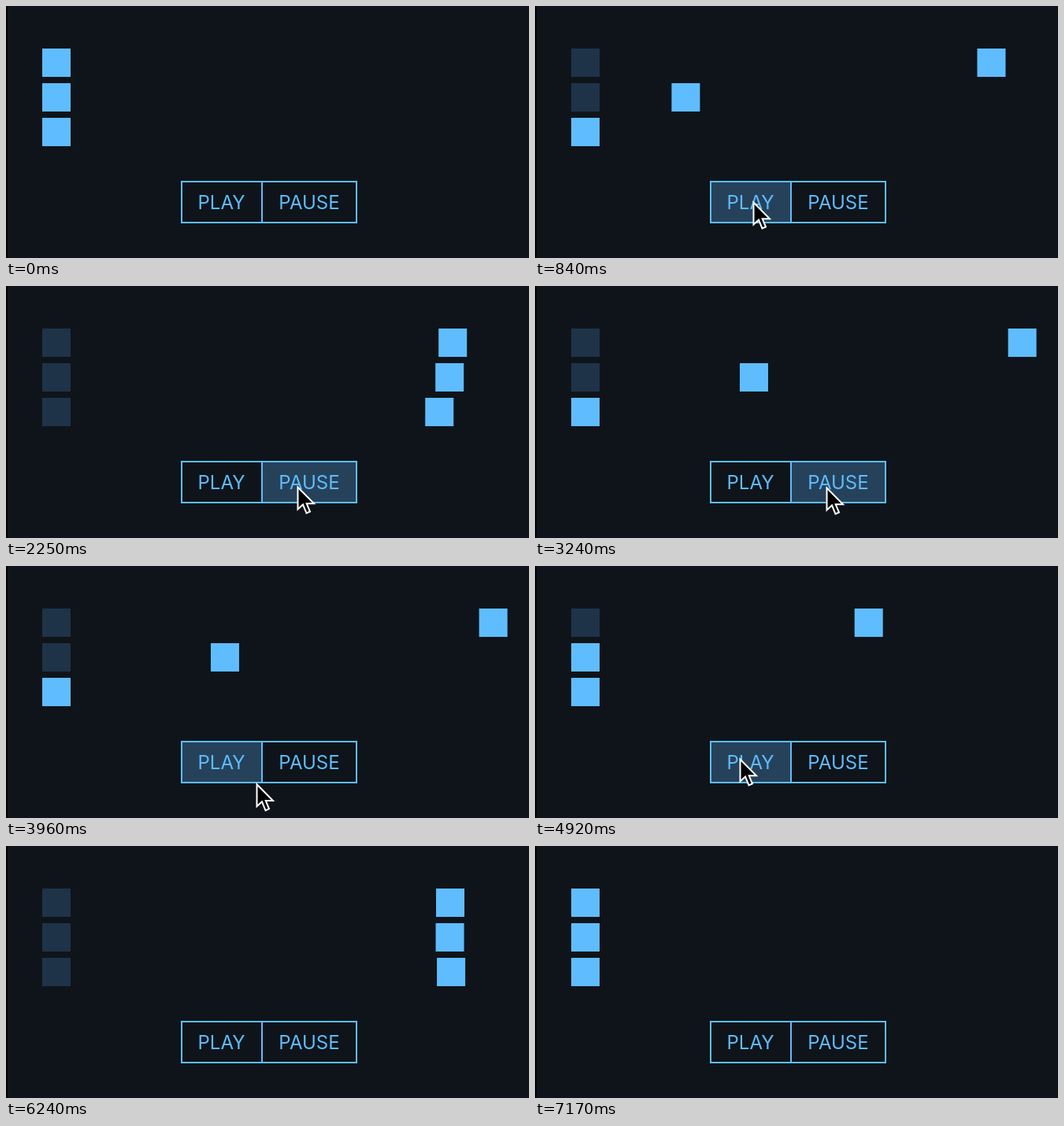
Write an HTML page that moves like this. It is 664 by 320 pixels and loops after 7.2 s.

```html
<!DOCTYPE html>
<html lang="en">
<head>
<meta charset="utf-8">
<title>Play and pause</title>
<style>
  html, body { margin: 0; width: 100%; height: 100%; overflow: hidden; background: #0f141a; }
  svg { display: block; width: 664px; height: 320px; }
  .shadow { fill: #1e3348; }
  .box { fill: #5fbdff; }
  .button { fill: transparent; }
  .button.hover { fill: #26425b; }
  .border { fill: none; stroke: #5fbdff; stroke-width: 2; }
  text { font: 400 24px Inter, Roboto, sans-serif; fill: #5fbdff; text-anchor: middle; }
  #cursor { fill: #000; stroke: #fff; stroke-width: 2; }
</style>
</head>
<body>
<svg viewBox="0 0 664 320">
  <rect width="2" height="320" fill="#000"/>
  <g id="boxes"></g>
  <rect class="button" x="223" y="223" width="102" height="52"/>
  <rect class="button" x="325" y="223" width="120" height="52"/>
  <path class="border" d="M223 223H445V275H223ZM325 223V275"/>
  <text x="273.5" y="258">PLAY</text>
  <text x="385" y="258">PAUSE</text>
  <path id="cursor" d="M1.5 2.5V30.5L8 24.5L12.5 35.5L17 33.5L12.7 23.3H22Z"/>
</svg>
<script>
const LOOP = 7200, STEP = 30, DISTANCE = 500, DURATION = 1000, STAGGER = 100;

// [time, playhead]: runs back and forth, held while paused
const playhead = [
  [722, 0], [1802, 1200], [1814, 1200], [2759, 150], [4860, 150],
  [4995, 0], [4998, 0], [6078, 1200], [7158, 0]
];

// [time, x, y] of the pointer tip
const pointer = [
  [30, 318, 324], [630, 276, 247], [1590, 276, 247], [2100, 369, 253],
  [2280, 369, 253], [2520, 369, 266], [2820, 369, 254], [3240, 369, 254],
  [3600, 345, 292], [3750, 330, 279], [4500, 262, 257], [4800, 259, 243],
  [5280, 259, 243], [5820, 290, 325]
];

const linear = p => p;
const smooth = p => p * p * (3 - 2 * p);
const elasticOut = p =>
  p <= 0 ? 0 : p >= 1 ? 1 : 1 - 2 ** (-10 * p) * Math.cos(4 * Math.PI * p);

function sample(keys, t, ease) {
  const next = keys.findIndex(k => k[0] > t);
  if (next < 0) return keys[keys.length - 1].slice(1);
  if (next === 0) return keys[0].slice(1);
  const a = keys[next - 1], b = keys[next];
  const p = ease((t - a[0]) / (b[0] - a[0]));
  return a.slice(1).map((v, i) => v + (b[i + 1] - v) * p);
}

const group = document.getElementById('boxes');
const cursor = document.getElementById('cursor');
const buttons = [...document.querySelectorAll('.button')];

function addBox(className, row) {
  const rect = document.createElementNS('http://www.w3.org/2000/svg', 'rect');
  const attrs = { class: className, x: 46, y: 54 + row * 44, width: 36, height: 36 };
  for (const name in attrs) rect.setAttribute(name, attrs[name]);
  return group.appendChild(rect);
}

const boxes = [0, 1, 2].map(row => {
  addBox('shadow', row);
  return addBox('box', row);
});

function contains(button, x, y) {
  const left = button.x.baseVal.value, top = button.y.baseVal.value;
  return x >= left && x < left + button.width.baseVal.value &&
    y >= top && y < top + button.height.baseVal.value;
}

function draw(t) {
  const [head] = sample(playhead, t, linear);
  boxes.forEach((box, i) => {
    const x = DISTANCE * elasticOut((head - i * STAGGER) / DURATION);
    box.setAttribute('transform', `translate(${x.toFixed(2)} 0)`);
  });
  const [x, y] = sample(pointer, t, smooth);
  cursor.setAttribute('transform', `translate(${x.toFixed(1)} ${y.toFixed(1)})`);
  buttons.forEach(b => b.classList.toggle('hover', contains(b, x, y)));
}

const start = performance.now();
function tick() {
  const t = (performance.now() - start) % LOOP;
  draw(Math.floor(t / STEP) * STEP);
  requestAnimationFrame(tick);
}
tick();
</script>
</body>
</html>
```
